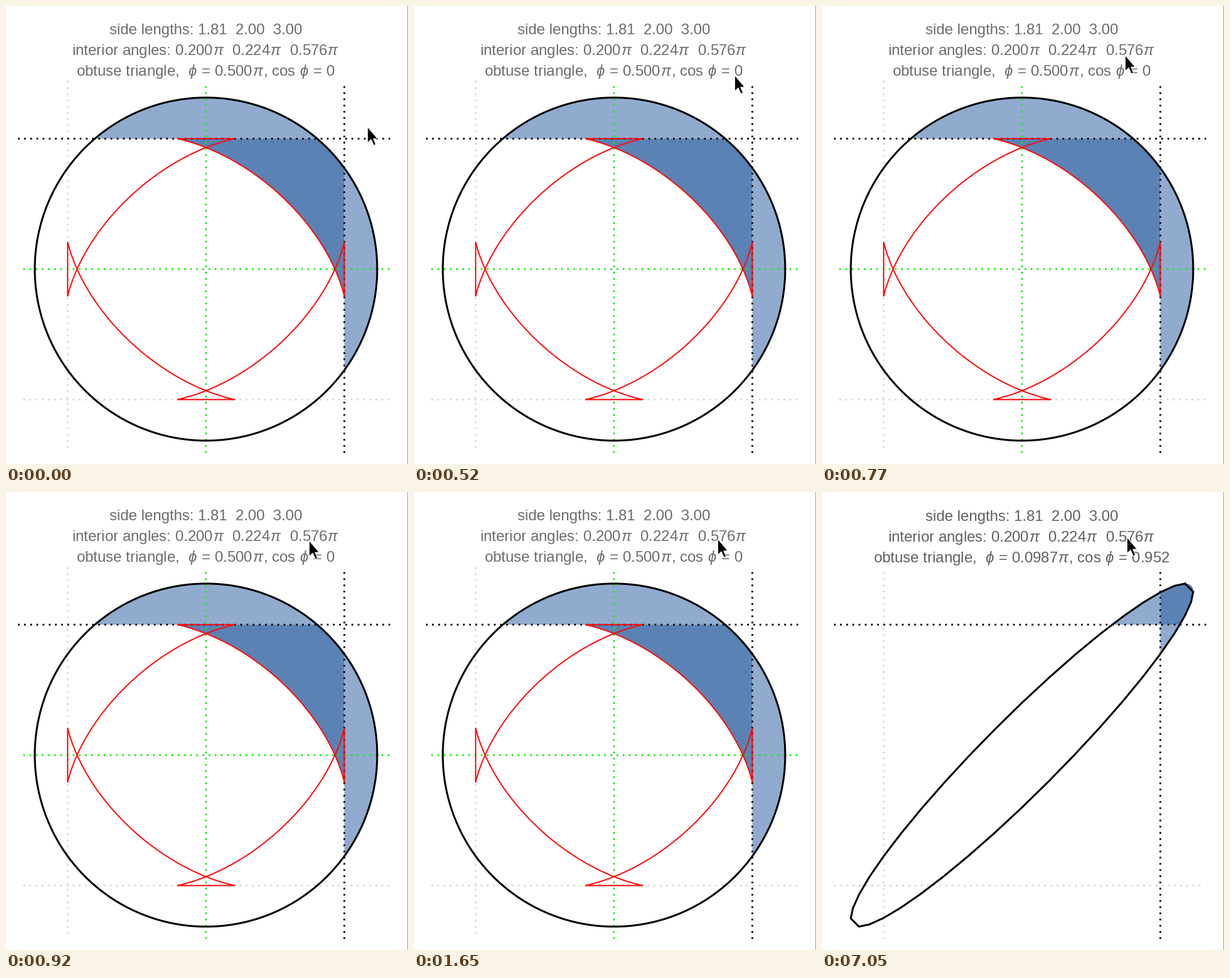
A matplotlib script for the animation above (8000 ms loop, 641 by 729 pixels).

```python
import numpy as np
import matplotlib.pyplot as plt
from matplotlib.animation import FuncAnimation
from matplotlib.patches import Polygon, Rectangle

W, H, DPI = 641, 729, 64
PT = 72 / DPI  # points per pixel
STEP, LOOP = 50, 8000

plt.rcParams.update({
    "font.family": "Liberation Sans",
    "mathtext.fontset": "custom",
    "mathtext.rm": "Liberation Sans",
    "mathtext.it": "Liberation Sans:italic",
    "lines.scale_dashes": False,
    "path.snap": False,
})

CX, CY, R = 318.4, 418.3, 273
COS_A, COS_B = 0.808, 0.7605
AX, BY = R * COS_A, R * COS_B
LIGHT, DARK = "#91abce", "#5a82b4"
GREY, GREEN, RED = "#d8d8d8", "#12f012", "#ff0a0a"

fig = plt.figure(figsize=(W / DPI, H / DPI), dpi=DPI, facecolor="white")
ax = fig.add_axes([0, 0, 1, 1])
ax.set_xlim(-0.5, W - 0.5)
ax.set_ylim(H - 0.5, -0.5)
ax.axis("off")


def to_px(x, y):
    return np.column_stack([CX + R * np.asarray(x), CY - R * np.asarray(y)])


def stroke(pts, color, width, z, **kw):
    pts = np.asarray(pts)
    return ax.plot(pts[:, 0], pts[:, 1], color=color, lw=width * PT,
                   zorder=z, **kw)[0]


def dotted(p, q, color, width=2.8):
    line = stroke([p, q], color, width, 3, dash_capstyle="butt")
    line.set_dashes([2.8 * PT, 7.05 * PT])
    return line


def hline(y, x0, x1, color):
    return dotted((x0, y), (x1, y), color)


def vline(x, y0, y1, color):
    return dotted((x, y0), (x, y1), color)


def ellipse(phi, n=240):
    t = np.linspace(0, 2 * np.pi, n)
    return to_px(np.cos(t), np.cos(t - phi))


def chopped_ellipse(phi, n=19):
    """Two branches between the points of tangency, joined by chords."""
    t = np.concatenate([np.linspace(phi, np.pi, n),
                        np.linspace(np.pi + phi, 2 * np.pi, n), [phi]])
    return to_px(np.cos(t), np.cos(t - phi))


def outline(pts):
    return stroke(pts, "black", 3, 6, solid_joinstyle="round")


def clipped(patch, clip):
    ax.add_patch(patch)
    patch.set_clip_path(clip)
    return patch


def regions(phi):
    """Parts of the ellipse beyond one or both of the limit lines."""
    clip = Polygon(ellipse(phi), fc="none", ec="none")
    ax.add_patch(clip)
    x, y = CX + AX, CY - BY
    boxes = [((0, 0), x, y, LIGHT),
             ((x, y), W - x, H - y, LIGHT),
             ((x, 0), W - x, y, DARK)]
    parts = [clipped(Rectangle(p, w, h, fc=c, lw=0, zorder=1), clip)
             for p, w, h, c in boxes]
    return parts, clip


def caption(angle, cosine, color, dy):
    pi, phi = (rf"$\hspace{{0.05}}\{name}\hspace{{0.05}}$"
               for name in ("pi", "phi"))
    rows = [
        "side lengths: 1.81  2.00  3.00",
        f"interior angles: 0.200{pi}  0.224{pi}  0.576{pi}",
        f"obtuse triangle,  {phi} = {angle}{pi}, cos {phi} = {cosine}",
    ]
    return [ax.text(318, y + dy, row, size=24 * PT, color=color,
                    ha="center", va="baseline", zorder=7)
            for y, row in zip((44.5, 77.6, 110.6), rows)]


def limits(shift):
    return [
        vline(CX - AX, 127 - shift, 718 - shift, GREY),
        hline(CY + BY, 19 + shift, 610 + shift, GREY),
        hline(CY - BY, 18.5, 612, "black"),
        vline(CX + AX, 127, 718, "black"),
    ]


def circle_scene():
    phi = np.pi / 2
    parts, clip = regions(phi)
    parts += limits(8)
    parts += [vline(CX, 127, 718, GREEN), hline(CY, 27, 618, GREEN)]

    # arc that meets the limit lines at both ends
    delta, size = np.arccos(-0.422), 1.028
    end = np.arccos(1 / size)
    t = np.linspace(end, delta - end, 80)
    u, v = size * COS_A * np.cos(t), size * COS_B * np.cos(t - delta)
    arc = to_px(u, v)
    corner = to_px([COS_A], [COS_B])
    parts.append(clipped(Polygon(np.vstack([arc, corner]), fc=DARK, lw=0,
                                 zorder=2), clip))
    loop = np.vstack([
        arc, to_px(-u[::-1], v[::-1]),
        to_px(-u, -v), to_px(u[::-1], -v[::-1]), arc[:1],
    ])
    parts.append(stroke(loop, RED, 2, 5, solid_joinstyle="round"))
    parts.append(outline(ellipse(phi)))
    return parts + caption("0.500", "0", "#6c6c6c", 0)


def ellipse_scene():
    phi = 0.0987 * np.pi
    parts, _ = regions(phi)
    parts += limits(0)
    parts.append(outline(chopped_ellipse(phi)))
    return parts + caption("0.0987", "0.952", "#606060", 1)


scenes = [circle_scene(), ellipse_scene()]
stroke([(640, -1), (640, H)], "#a0a0a0", 1, 8)

ARROW = np.array([(0, 0), (0, 25), (5.5, 19.8), (10, 29.3), (13.2, 27.8),
                  (9.2, 18.6), (15.8, 18.6)])
arrow = Polygon(ARROW, fc="black", ec="white", lw=0.9 * PT, zorder=10)
ax.add_patch(arrow)

BX, BT, BB = 532.7, 127, 141
BEAM = [[(BX, BT + 1), (BX, BB - 1)], [(BX - 2, 137), (BX + 2, 137)]]
BEAM += [[(BX + s, y), (BX + 3.5 * s, y)] for s in (-1, 1) for y in (BT, BB)]
beam = [stroke(seg, c, w, z) for c, w, z in (("white", 3, 9), ("black", 1.3, 10))
        for seg in BEAM]

# start time in ms and arrow tip; None shows the text beam
POINTER = [(0, (576, 192)), (250, None), (500, (511, 110)), (650, (490.5, 87)),
           (750, (483, 78)), (900, (483, 77)), (1350, (483, 76)),
           (1650, (484, 74.5)), (1800, (485, 73.5)), (1950, (486, 72))]
SWITCH = 7050


def draw(i):
    ms = i * STEP
    tip = [pos for start, pos in POINTER if start <= ms][-1]
    arrow.set_visible(tip is not None)
    if tip is not None:
        arrow.set_xy(ARROW + tip)
    for part in beam:
        part.set_visible(tip is None)
    for k, scene in enumerate(scenes):
        for part in scene:
            part.set_visible(k == (ms >= SWITCH))
    return []


anim = FuncAnimation(fig, draw, frames=LOOP // STEP, interval=STEP,
                     repeat=True, repeat_delay=0, blit=False)
plt.show()
```
